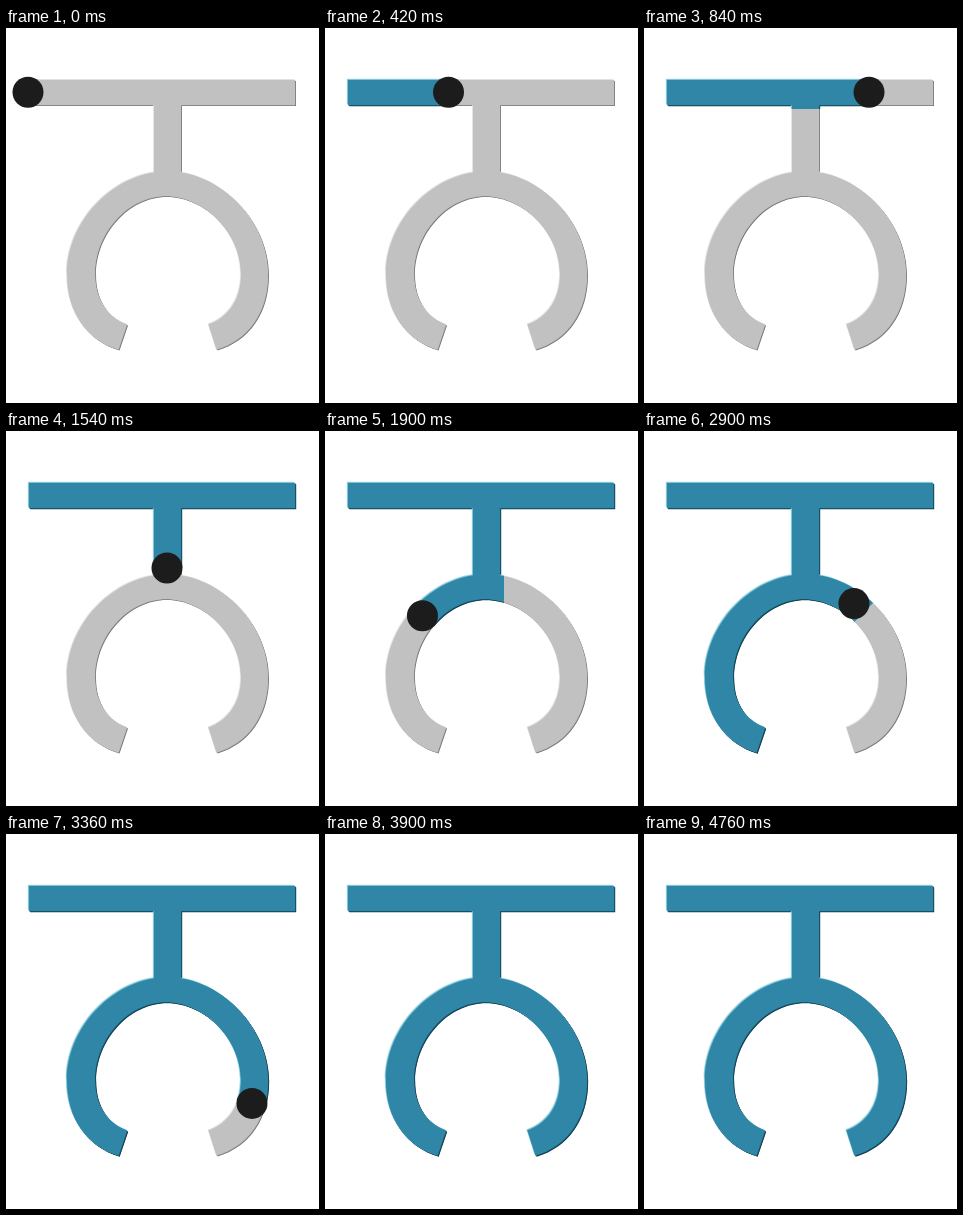
An HTML page that plays this animation: 313 by 375 pixels, repeating every 4.8 s.

```html
<!DOCTYPE html>
<html lang="en">
<head>
<meta charset="utf-8">
<title>Letter stroke order</title>
<style>
html, body { margin: 0; width: 100%; height: 100%; overflow: hidden; background: #fff; }
svg { display: block; width: 100vw; height: 100vh; }
</style>
</head>
<body>
<svg viewBox="0 0 313 375">
  <defs>
    <path id="glyph" d="M23 52H289V77H175V144.500C223 152 262 198 262 246C262 285 242 312 210.500 321.500L202.500 296.500C223 289 235 271 235 246C235 205 198 168 160 168C122 168 89 205 89 246C89 271 101 289 121 296.500L112.500 321.500C81 312 61 285 61 246C61 198 100 152 148 144.500V77H23Z"/>
    <mask id="ink" maskUnits="userSpaceOnUse" x="0" y="0" width="313" height="375">
      <g id="reveal" fill="none" stroke="#fff"></g>
    </mask>
  </defs>
  <g id="base"></g>
  <g id="fill" mask="url(#ink)"></g>
  <circle id="ball" r="15.5" fill="#1c1c1c"/>
</svg>
<script>
const NS = 'http://www.w3.org/2000/svg';
const LOOP = 4800, STEP = 20, HOLD = 80;
const $ = id => document.getElementById(id);

function add(parent, tag, attrs) {
  const el = document.createElementNS(NS, tag);
  for (const k in attrs) el.setAttribute(k, attrs[k]);
  return parent.appendChild(el);
}

// Bevel: offset copies, lit from the top left.
function bevel(parent, layers) {
  for (const [shift, fill] of layers)
    add(parent, 'use', { href: '#glyph', fill, transform: `translate(${shift} ${shift})` });
}
bevel($('base'), [[1, '#6e6e6e'], [-1, '#ececec'], [0.4, '#a2a2a2'], [-0.4, '#dadada'], [0, '#c1c1c1']]);
bevel($('fill'), [[1.2, '#0d3c4e'], [-1.2, '#a5dbe8'], [0.5, '#1f6681'], [-0.5, '#5fb0c8'], [0, '#2f86a6']]);

const LEFT = 'M160 155C112 158 73 198 72.700 246C72.500 282 88 302 116 309.500';
const RIGHT = 'M171 155.500C218 165 248.500 205 248.500 248C248.500 282 232 303 206 309.500';

// lead: how far the colour runs ahead of the ball at progress p
const strokes = [
  { d: 'M22 64.200H283.500', area: 'M20 64H296', width: 34, start: 0, speed: 0.2417, lead: p => 2 + 6 * p },
  { d: 'M161 64V152', area: 'M161 64V172', width: 36, start: 1233, speed: 0.238, lead: p => Math.max(0, p - 0.83) * 118 },
  { d: LEFT, area: LEFT + 'l8 2', width: 46, start: 1602, speed: 0.238, lead: () => 0 },
  { d: RIGHT, area: RIGHT + 'l-8 2', width: 46, start: 2720, speed: 0.238, lead: p => Math.max(0, 18 - 24 * p) }
];

for (const s of strokes) {
  s.path = document.createElementNS(NS, 'path');
  s.path.setAttribute('d', s.d);
  s.len = s.path.getTotalLength();
  s.mask = add($('reveal'), 'path', { d: s.area, 'stroke-width': s.width });
}

function draw(t) {
  let pos = null;
  for (const s of strokes) {
    const run = (t - s.start) * s.speed;
    const dist = Math.min(run, s.len);
    let shown = 0;
    if (run >= s.len) shown = 999;
    else if (run > 0) shown = dist + s.lead(dist / s.len);
    s.mask.setAttribute('stroke-dasharray', `${shown} 999`);
    if (run >= 0 && run < s.len + HOLD * s.speed) pos = s.path.getPointAtLength(dist);
  }
  const ball = $('ball');
  ball.style.display = pos ? '' : 'none';
  if (pos) ball.setAttribute('transform', `translate(${pos.x} ${pos.y})`);
}

const begin = performance.now();
function tick() {
  const t = (performance.now() - begin) % LOOP;
  draw(Math.floor(t / STEP) * STEP);
  requestAnimationFrame(tick);
}
tick();
</script>
</body>
</html>
```
